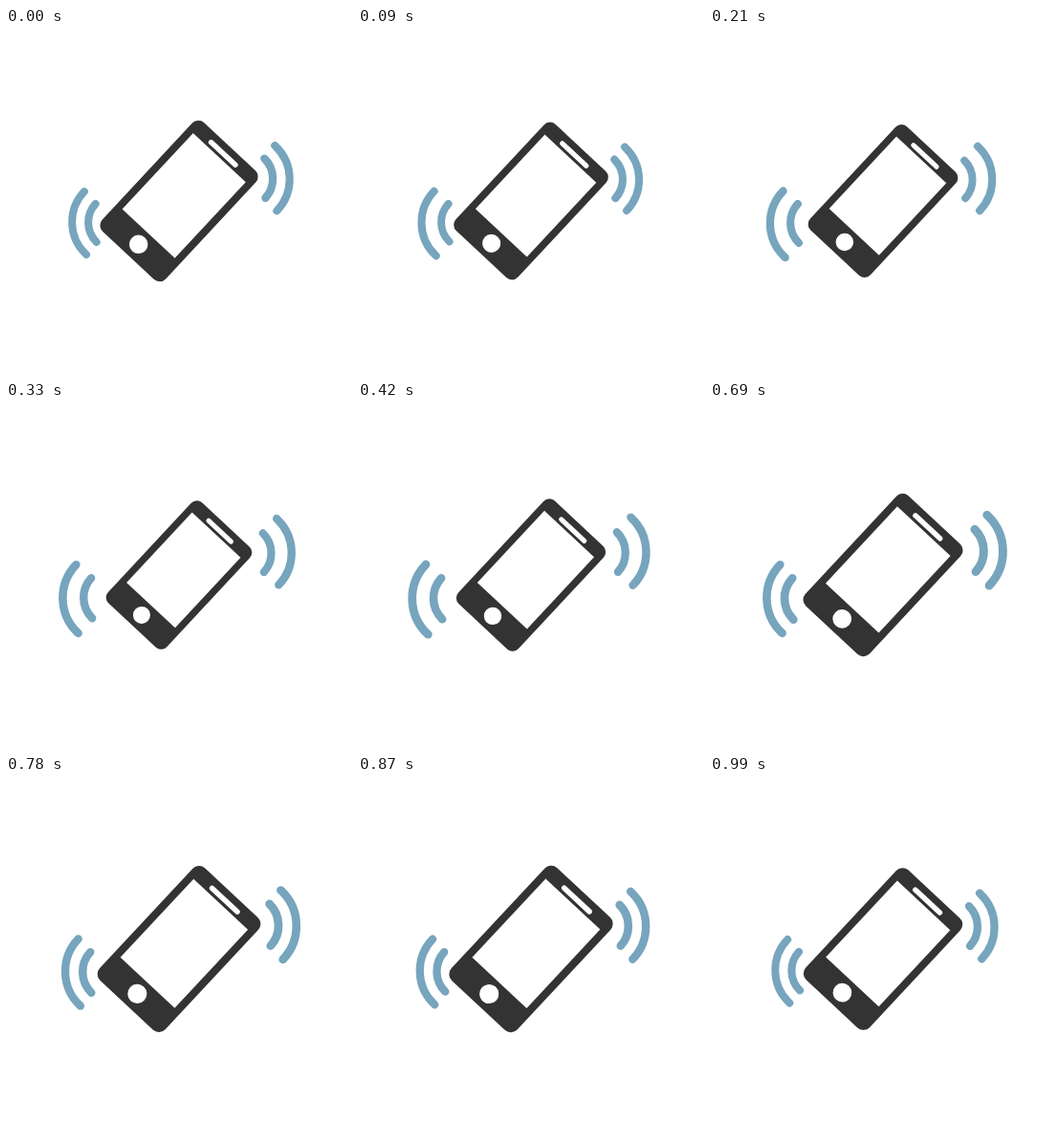
Write an HTML page with a canvas that moves like this. It is 362 px wide and 362 px high and loops after 1.02 s.

```html
<!DOCTYPE html>
<html lang="en">
<head>
<meta charset="utf-8">
<title>Vibrating phone</title>
<style>
  html, body { margin: 0; width: 100%; height: 100%; overflow: hidden; background: #fff; }
  canvas { display: block; width: 100vw; height: 100vh; }
</style>
</head>
<body>
<canvas id="stage" width="362" height="362"></canvas>
<script>
const SIZE = 362, LOOP = 1020, STEP = 30;
const DARK = '#333333', BLUE = '#76a5bd', WHITE = '#ffffff';
const ctx = document.getElementById('stage').getContext('2d');

// Linear there-and-back pulse, largest at the given peak time.
function pulse(t, peak) {
  const d = (((t - peak) % LOOP) + LOOP) % LOOP;
  return 1.063 - 0.126 * Math.min(d, LOOP - d) / (LOOP / 2);
}

// Draw around the stage centre, scaled and turned.
function part(scale, angle, draw) {
  ctx.save();
  ctx.translate(SIZE / 2, SIZE / 2);
  ctx.scale(scale, scale);
  ctx.rotate(angle);
  draw();
  ctx.restore();
}

function box(x, y, w, h, r, color) {
  ctx.fillStyle = color;
  ctx.beginPath();
  ctx.roundRect(x, y, w, h, r);
  ctx.fill();
}

function phone() {
  box(-44.7, -76.6, 89.4, 153.2, 8.8, DARK);
  box(-37, -61, 74, 107, 0, WHITE);
  box(-19.8, -69.4, 39.6, 5.3, 2.65, WHITE);
  ctx.beginPath();
  ctx.arc(0, 61, 9.6, 0, Math.PI * 2);
  ctx.fill();
}

// Arc from (x1, y1) to (x2, y2), bulging to the left.
function wave(x1, y1, x2, y2, r) {
  const dx = x2 - x1, dy = y2 - y1, len = Math.hypot(dx, dy);
  const k = Math.sqrt(r * r - len * len / 4) / len;
  const cx = (x1 + x2) / 2 + dy * k, cy = (y1 + y2) / 2 - dx * k;
  ctx.beginPath();
  ctx.arc(cx, cy, r, Math.atan2(y1 - cy, x1 - cx), Math.atan2(y2 - cy, x2 - cx), true);
  ctx.strokeStyle = BLUE;
  ctx.lineWidth = 8.4;
  ctx.lineCap = 'round';
  ctx.stroke();
}

const outer = () => wave(-105.7, -10.6, -103.5, 59.8, 49.3);
const inner = () => wave(-91.7, 3.2, -90.6, 45.1, 30.3);

const parts = [
  [510, 0, outer],
  [575, 0, inner],
  [640, Math.PI, outer],
  [708, Math.PI, inner],
  [832, 43 * Math.PI / 180, phone]
];

function frame(now) {
  const t = Math.floor((now + 0.5) / STEP) * STEP % LOOP;
  ctx.fillStyle = WHITE;
  ctx.fillRect(0, 0, SIZE, SIZE);
  for (const [peak, angle, draw] of parts) part(pulse(t, peak), angle, draw);
}

function tick() {
  frame(performance.now());
  requestAnimationFrame(tick);
}

frame(0);
requestAnimationFrame(tick);
</script>
</body>
</html>
```
